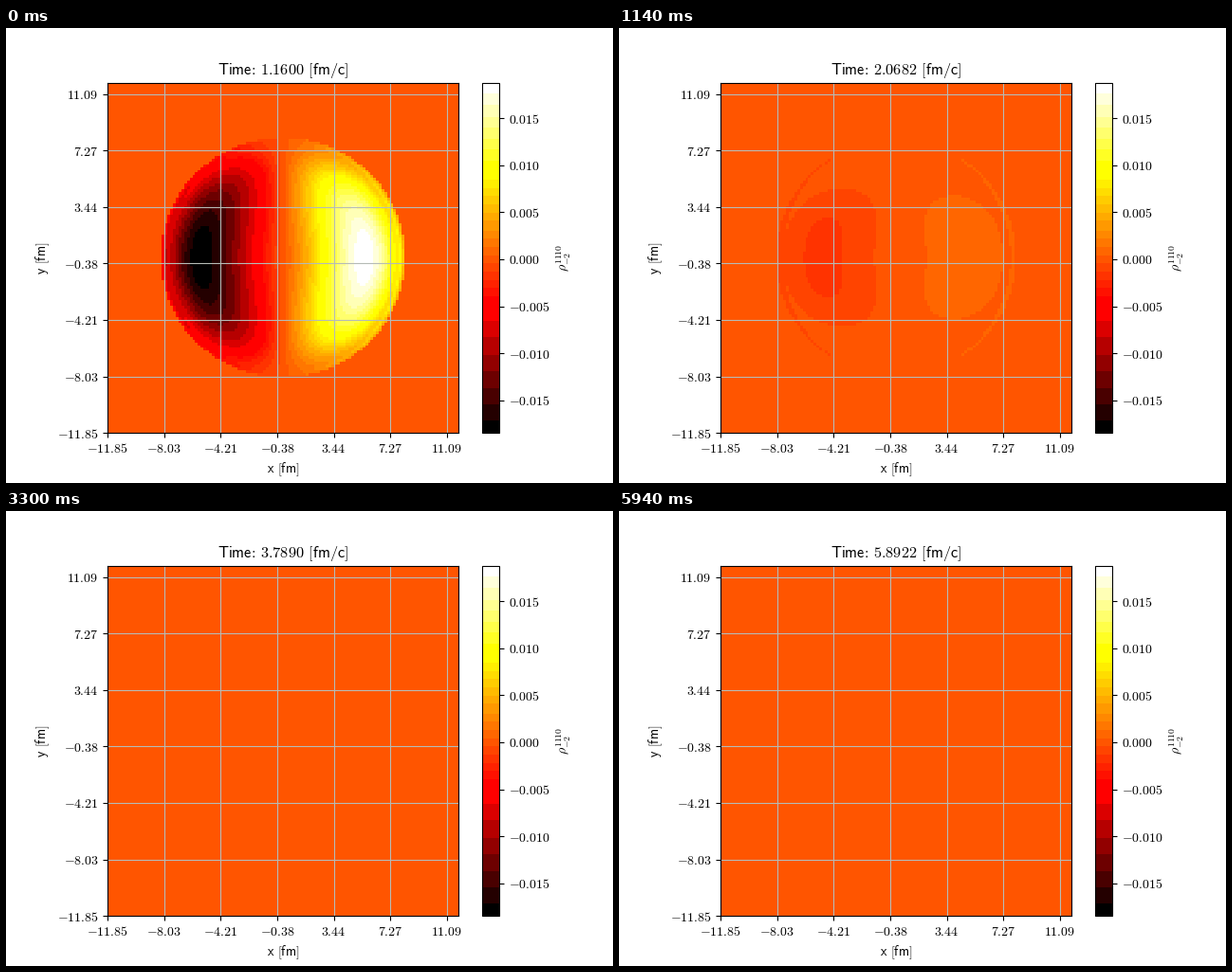
A matplotlib script for the animation above (6 s loop, 640x480 px).

```python
import numpy as np
import matplotlib.pyplot as plt
from matplotlib.animation import FuncAnimation
from matplotlib.colors import ListedColormap

plt.rcParams["mathtext.fontset"] = "cm"

FRAMES, INTERVAL = 100, 60
T0, DT = 1.16, 0.0478
CELLS, HALF = 124, 11.854
VMIN, VMAX = -0.01845, 0.01877
GAP = r"\hspace{0.38}"

# Peak strength of each lobe, interpolated on log-log axes
TIMES = np.log([1.16, 1.3034, 1.5902, 2.6418, 5.9])
POS = np.log([0.0187, 0.0107, 0.0042, 0.00036, 0.00001])
NEG = np.log([0.0185, 0.0122, 0.0047, 0.00063, 0.00001])


def stepped_hot():
    """Hot colormap with 8 red, 16 green and 8 blue steps."""
    rgb = plt.get_cmap("hot")(np.linspace(0, 1, 256))[:, :3]
    steps = np.array([8, 16, 8])
    level = np.minimum(np.floor(rgb * 255 / 256 * steps), steps - 1)
    return ListedColormap(level / (steps - 1))


def sans(text):
    return rf"$\mathsf{{{text}}}$"


def title(t):
    colon = r"\hspace{-0.2}:\hspace{-0.2}"
    return sans(f"Time{colon}{GAP}{t:.4f}{GAP}[fm/c]")


centers = (np.arange(CELLS) + 0.5) * 2 * HALF / CELLS - HALF
X, Y = np.meshgrid(centers, centers)
R = np.hypot(X, Y)


def field(t):
    age = np.log(t / T0)
    # Dipole, linear inside and falling off smoothly towards the rim
    rim = 6.9 - 1.77 * age**2
    rise = 0.75 + 0.38 * (1 - np.exp(-R**2 / 9))
    lobes = X * rise / (1 + np.exp((R - rim) / 0.75))
    lobes *= np.exp(-(age / 0.823)**4 * (Y / 3.44)**4)
    lobes /= lobes.max()
    pos, neg = (np.exp(np.interp(np.log(t), TIMES, a)) for a in (POS, NEG))
    value = lobes * np.where(X > 0, pos, neg)

    # Thin edge that decays more slowly than the lobes
    edge = 0.00058 * (2.6418 / t)**1.8 * np.exp(-((R - 7.97) / 0.15)**2)
    value += edge * X / R * np.where(X > 0, 1, 0.85)

    cut = 8.27 - 0.25 * age
    inside = (X / cut)**2 + (Y / (cut - 0.17))**2 < 1
    return np.where(inside, value, 0)


fig, ax = plt.subplots(figsize=(6.4, 4.8), dpi=100)
image = ax.imshow(field(T0), origin="lower", extent=[-HALF, HALF, -HALF, HALF],
                  cmap=stepped_hot(), vmin=VMIN, vmax=VMAX,
                  interpolation="nearest")
bar = fig.colorbar(image, ax=ax)
bar_ticks = np.arange(-3, 4) * 0.005
bar.set_ticks(bar_ticks, labels=[f"${v:.3f}$" for v in bar_ticks + 0.0])
bar.set_label(r"$\rho^{1110}_{-2}$")

ticks = -HALF + np.arange(0, CELLS, 20) * 2 * HALF / CELLS
labels = [f"${v:.2f}$" for v in ticks]
ax.set_xticks(ticks, labels)
ax.set_yticks(ticks, labels)
ax.set_xlabel(sans(f"x{GAP}[fm]"))
ax.set_ylabel(sans(f"y{GAP}[fm]"))
ax.grid(color="#b6bbb6", linewidth=0.8)
heading = ax.set_title(title(T0), fontsize=11.75)


def update(i):
    t = T0 + DT * i
    image.set_data(field(t))
    heading.set_text(title(t))
    return image, heading


anim = FuncAnimation(fig, update, frames=FRAMES, interval=INTERVAL,
                     repeat=True, repeat_delay=0)
plt.show()
```
